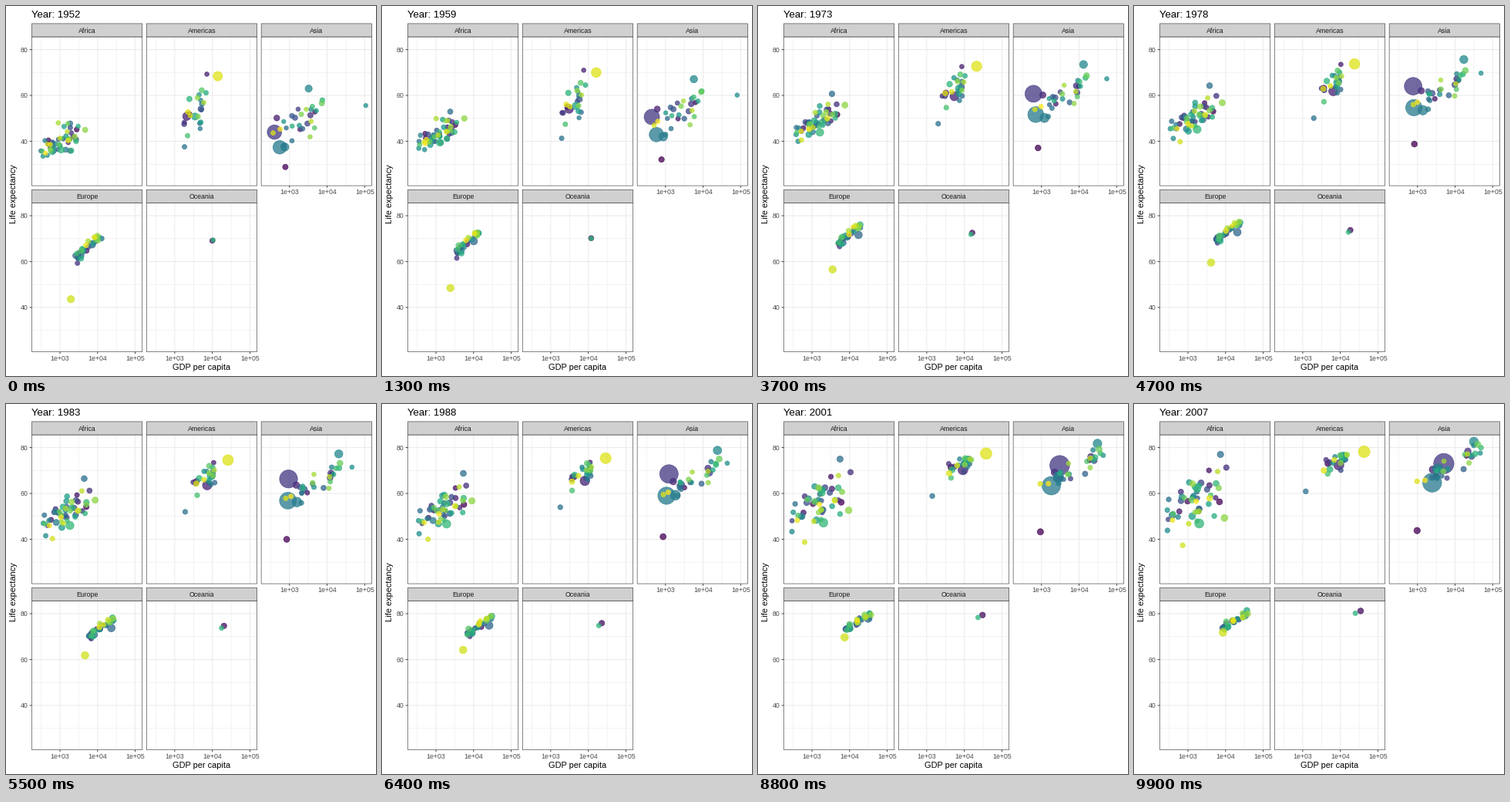
These frames come from a looping animation (480 by 480 pixels, 10000 ms). A matplotlib script:

```python
import numpy as np
import matplotlib as mpl
import matplotlib.pyplot as plt
from matplotlib.animation import FuncAnimation
from matplotlib.patches import Rectangle

mpl.rcParams["font.family"] = "Liberation Sans"
rng = np.random.default_rng(12)

FRAMES, STEPS = 100, 12          # one key position every five years
WIDTH, HEIGHT = 143.37, 193.1    # panel size in px
COLS, ROWS = (33.4, 182.27, 331.13), (40.0, 255.5)
LOG_MIN, LOG_SPAN = 2.2487, 2.94
LIFE_MAX, LIFE_SPAN = 85.553, 64.904
RANKS, MAX_POP = 141, 1318.7
TIME = np.linspace(0, 1, STEPS)


def px(col, log):
    return COLS[col] + (log - LOG_MIN) / LOG_SPAN * WIDTH


def py(row, life):
    return ROWS[row] + (LIFE_MAX - life) / LIFE_SPAN * HEIGHT


def curve(start, middle, end):
    """Parabola through three values at the start, middle and end of the loop."""
    return start + (end - start) * TIME + (4 * middle - 2 * start - 2 * end) * TIME * (1 - TIME)


def bubble(rank, pop, *points):
    logs, lives = zip(*points)
    return rank, pop, curve(*logs), curve(*lives)


def crowd(n, logs, lives, noise, growth, trend, spread, bulge):
    """Seeded bubbles drifting from an early income-life band to a late one."""
    rows = []
    for rank in (np.arange(n) + rng.random(n)) / n * RANKS:
        g0 = rng.uniform(*logs)
        l0 = np.interp(g0, logs, lives) + rng.normal(0, noise)
        g2 = np.clip(g0 + rng.normal(*growth), 2.45, 4.65)
        l2 = min(trend[0] + trend[1] * (g2 - 3.5) + rng.normal(0, spread), 81.5)
        middle = (g0 + g2) / 2 + bulge[0], (l0 + l2) / 2 + bulge[1]
        rank, pop, g, life = bubble(rank, 10 ** rng.normal(0.95, 0.35),
                                    (g0, l0), middle, (g2, l2))
        rows.append((rank, pop, g + rng.normal(0, 0.025, STEPS),
                     life + rng.normal(0, 0.3, STEPS)))
    return rows


# Name, column, row, early share of the late population, bubbles.
# Leading bubbles: colour rank, millions, three (log income, life) points.
PANELS = [
    ("Africa", 0, 0, 0.28, [
        bubble(94, 135, (3.03, 36.3), (3.25, 45.5), (3.3, 46.9)),
        bubble(117, 44, (3.67, 45), (3.92, 57), (3.97, 49.3)),
    ] + crowd(50, (2.48, 3.5), (36, 44), 4, (0.15, 0.28), (57, 9), 6,
              (0.06, 2.5))),
    ("Americas", 1, 0, 0.5, [
        bubble(14, 190, (3.32, 50.9), (3.83, 62.4), (3.96, 72.4)),
        bubble(53, 8, (3.26, 37.6), (3.29, 50.7), (3.08, 60.9)),
        bubble(82, 109, (3.54, 50.8), (3.94, 66.3), (4.08, 76.2)),
        bubble(134, 301, (4.146, 68.4), (4.39, 74), (4.633, 78.2)),
    ] + crowd(21, (3.2, 3.85), (45, 62), 5, (0.38, 0.14), (71, 7), 1.8,
              (0.08, 2))),
    ("Asia", 2, 0, 0.42, [
        bubble(0, 32, (2.89, 28.8), (2.92, 39.2), (2.99, 43.8)),
        bubble(24, 1318, (2.6, 44), (2.91, 64.8), (3.7, 73)),
        bubble(58, 1110, (2.74, 37.4), (2.92, 55.4), (3.39, 64.7)),
        bubble(59, 224, (2.875, 37.5), (3.16, 54.4), (3.55, 70.6)),
        bubble(66, 127, (3.51, 63), (4.26, 76.2), (4.5, 82.6)),
        bubble(71, 2.5, (5.03, 55.6), (4.68, 70.3), (4.67, 77.6)),
    ] + crowd(27, (2.6, 3.85), (38, 56), 5.5, (0.6, 0.3), (68.5, 10), 2,
              (0.08, 2.5))),
    ("Europe", 0, 1, 0.8, [
        bubble(47, 82, (3.85, 67.5), (4.33, 73.1), (4.51, 79.4)),
        bubble(131, 71, (3.29, 43.6), (3.63, 60.3), (3.93, 71.8)),
    ] + crowd(28, (3.35, 4.08), (59.5, 71.5), 1.3, (0.5, 0.08), (69, 10.5), 0.8,
              (0.08, 1.8))),
    ("Oceania", 1, 1, 0.44, [
        bubble(5, 20, (4, 69.1), (4.28, 74), (4.54, 81.2)),
        bubble(91, 4, (4.02, 69.4), (4.225, 73.1), (4.4, 80.2)),
    ]),
]

fig = plt.figure(figsize=(480 / 72, 480 / 72), dpi=72, facecolor="white")
ax = fig.add_axes((0, 0, 1, 1))
ax.set(xlim=(0, 480), ylim=(480, 0))
ax.axis("off")


def line(xs, ys, color, width):
    ax.plot(xs, ys, color=color, lw=width, zorder=1, snap=False,
            solid_capstyle="butt")


def box(x, y, w, h, face):
    ax.add_patch(Rectangle((x, y), w, h, fc=face, ec="#333333", lw=0.6,
                           zorder=4, snap=False))


def label(x, y, text, size=8.8, color="#4d4d4d", ha="center", **kw):
    return ax.text(x, y, text, size=size, color=color, ha=ha,
                   va="baseline", **kw)


def draw_panel(name, col, row):
    left, top = COLS[col], ROWS[row]
    right, bottom = left + WIDTH, top + HEIGHT
    for width, logs, lives in ((0.6, (2.5, 3.5, 4.5), (30, 50, 70)),
                               (1.07, (3, 4, 5), (40, 60, 80))):
        for g in logs:
            line([px(col, g)] * 2, [top, bottom], "#ebebeb", width)
        for v in lives:
            line([left, right], [py(row, v)] * 2, "#ebebeb", width)
    box(left, top, WIDTH, HEIGHT, "none")
    box(left, top - 17.1, WIDTH, 17.1, "#d0d0d0")
    label(left + WIDTH / 2, top - 5.4, name, color="#1a1a1a", zorder=5)
    if col == 0:
        for v in (40, 60, 80):
            y = py(row, v)
            line([left - 2.75, left], [y, y], "#333333", 0.9)
            label(left - 4.95, y + 3.2, str(v), ha="right")
    if row == 1 or col == 2:
        for g in (3, 4, 5):
            x = px(col, g)
            line([x, x], [bottom, bottom + 2.75], "#333333", 0.9)
            label(x, bottom + 11.3, f"1e+0{g}")


bubbles = []
for name, col, row, share, rows in PANELS:
    draw_panel(name, col, row)
    for rank, pop, logs, lives in rows:
        people = pop * np.linspace(share, 1, STEPS)
        size = 2 + 10 * np.sqrt(people / MAX_POP)
        diameter = 0.75 * (size * 2.845 + 0.945)
        bubbles.append((rank, px(col, logs), py(row, lives), diameter))
bubbles.sort(key=lambda b: b[0])
keys = np.array([b[1:] for b in bubbles])        # bubble, (x, y, d), step
colors = plt.get_cmap("viridis")(np.array([b[0] for b in bubbles]) / RANKS)
colors[:, 3] = 0.76

title = label(33.4, 15.2, "", 13.2, "black", "left")
label(253.95, 472.3, "GDP per capita", 11, "black")
label(13.4, 243.7, "Life expectancy", 11, "black", rotation=90,
      rotation_mode="anchor")
dots = ax.scatter(keys[:, 0, 0], keys[:, 1, 0], s=keys[:, 2, 0] ** 2,
                  c=colors, edgecolors=colors, linewidths=0.71, zorder=3)


def update(i):
    pos = i / (FRAMES - 1) * (STEPS - 1)
    k = min(int(pos), STEPS - 2)
    now = keys[:, :, k] + (keys[:, :, k + 1] - keys[:, :, k]) * (pos - k)
    dots.set_offsets(now[:, :2])
    dots.set_sizes(now[:, 2] ** 2)
    title.set_text(f"Year: {round(1952 + 55 * i / (FRAMES - 1))}")
    return dots, title


anim = FuncAnimation(fig, update, frames=FRAMES, interval=100,
                     repeat=True, repeat_delay=0)
plt.show()
```
